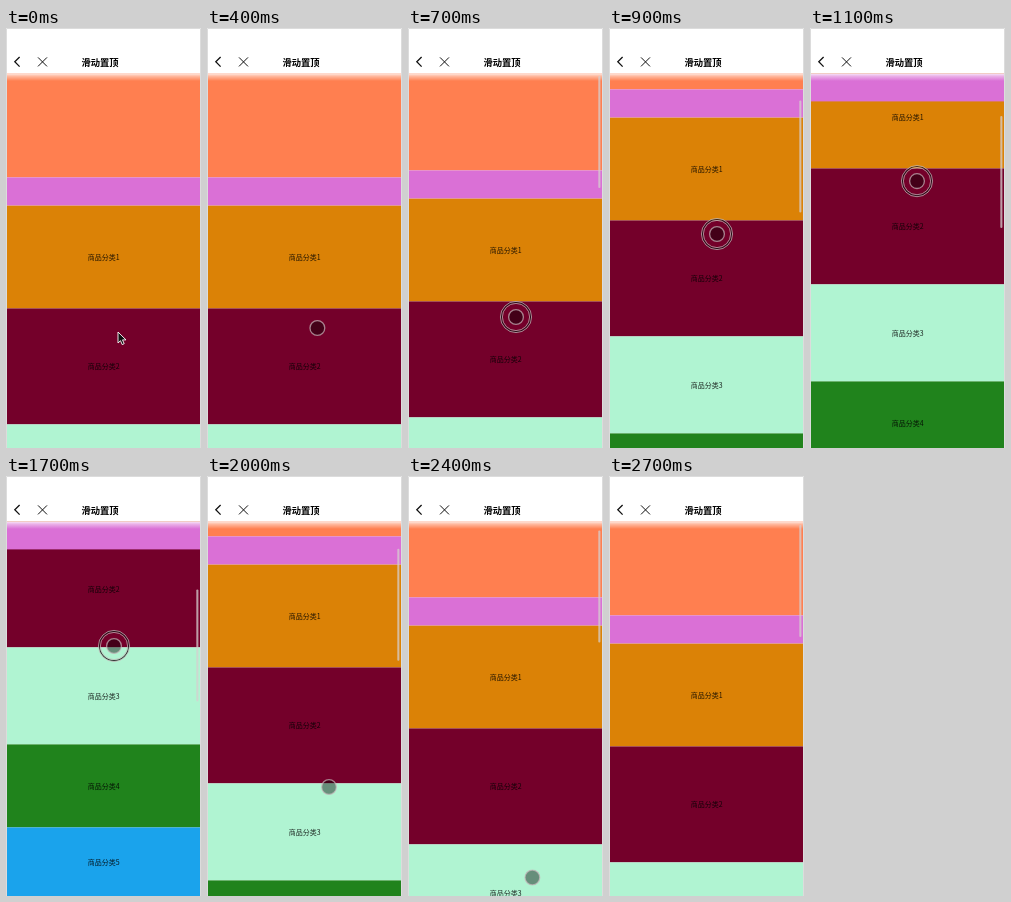
Animation of 195x420 px, one loop 2800 ms. Source, as an HTML page:

```html
<!DOCTYPE html>
<html lang="zh-CN">
<head>
<meta charset="utf-8">
<style>
html, body { margin: 0; width: 100%; height: 100%; overflow: hidden; background: #fff; }
svg { display: block; width: 195px; height: 420px; }
text { font-family: "Noto Sans CJK SC", "Noto Sans CJK", sans-serif; text-anchor: middle; }
</style>
</head>
<body>
<svg viewBox="0 0 195 420">
  <defs>
    <linearGradient id="fade" x1="0" y1="0" x2="0" y2="1">
      <stop offset="0" stop-color="#fff" stop-opacity=".9"/>
      <stop offset=".4" stop-color="#fff" stop-opacity=".45"/>
      <stop offset="1" stop-color="#fff" stop-opacity="0"/>
    </linearGradient>
    <clipPath id="view"><rect x="1" y="45.5" width="193" height="375"/></clipPath>
  </defs>
  <rect width="195" height="420" fill="#fff"/>
  <g clip-path="url(#view)">
    <g id="page"><rect x="1" width="193" height="149" fill="#ff7f50"/></g>
    <rect id="tab" x="1" width="193" height="28" fill="#da70d6"/>
    <rect x="1" y="45" width="193" height="8" fill="url(#fade)"/>
    <rect id="thumb" x="190.3" width="2.1" height="112" rx="1" fill="#d6cfcf" fill-opacity=".75"/>
  </g>
  <path d="M.5 420V.5H194.5V420" fill="none" stroke="#dcdcdc"/>
  <g fill="none" stroke="#111">
    <path d="M13.6 29L8.8 33.8L13.6 38.6" stroke-width="1.3"/>
    <path d="M32 29.4L41 38.4M41 29.4L32 38.4"/>
  </g>
  <text x="94" y="37.5" font-size="9.3" font-weight="700">滑动置顶</text>
  <g id="touch">
    <g id="ring" fill="none">
      <circle r="14.6" stroke="#1c1216" stroke-opacity=".8" stroke-width="1.2"/>
      <circle r="15.6" stroke="#c4bcbc" stroke-opacity=".8" stroke-width=".9"/>
      <circle r="13.6" stroke="#c4bcbc" stroke-opacity=".8" stroke-width=".9"/>
    </g>
    <circle r="7.4" fill="#000" fill-opacity=".42" stroke="#c8b8bc" stroke-opacity=".7" stroke-width="1.3"/>
  </g>
  <path id="arrow" d="M0 0V11L2.5 8.7L4.2 12.6L6.2 11.7L4.5 7.9H8Z" fill="#111" stroke="#fff" stroke-width=".9"/>
</svg>
<script>
const LOOP = 2800, STEP = 100;
const TOP = 45, TAB_Y = 149, SHIFT = 0.4;
const $ = id => document.getElementById(id);

// Gesture keys: time, scroll offset, hand x, hand y
const KEYS = [
  [0, 0, 112, 304],
  [600, 0, 109, 296],
  [700, 7, 108, 289],
  [900, 88, 108, 206],
  [1300, 178, 106, 127],
  [1700, 225, 108, 170],
  [2000, 89, 122, 311],
  [2700, 10, 125, 430]
];

function add(tag, attrs, text = '') {
  const el = document.createElementNS('http://www.w3.org/2000/svg', tag);
  for (const k in attrs) el.setAttribute(k, attrs[k]);
  el.textContent = text;
  $('page').appendChild(el);
}

function buildPage() {
  const parts = [[103, '#db8206'], [116, '#74002a'], [97, '#b0f4d2'], [83, '#20831c'], [70, '#1aa3ec']];
  let y = TAB_Y + 28;
  parts.forEach(([height, fill], i) => {
    add('rect', { x: 1, y, width: 193, height, fill });
    add('text', { x: 97.6, y: y + height / 2 + 2.7, 'font-size': 7, 'fill-opacity': 0.85 }, '商品分类' + (i + 1));
    y += height;
  });
}

const slope = (i, c) => (KEYS[i + 1][c] - KEYS[i][c]) / (KEYS[i + 1][0] - KEYS[i][0]);

// Harmonic mean of both slopes; flat at turning points and ends
function tangent(i, c) {
  if (i === 0 || i === KEYS.length - 1) return 0;
  const a = slope(i - 1, c), b = slope(i, c);
  return a * b > 0 ? 2 * a * b / (a + b) : 0;
}

// Smooth value of column c at time t, without overshoot
function glide(c, t) {
  let i = 0;
  while (i < KEYS.length - 2 && t >= KEYS[i + 1][0]) i++;
  const [p, q] = [KEYS[i], KEYS[i + 1]];
  const span = q[0] - p[0], u = (t - p[0]) / span, v = 1 - u;
  return p[c] * v * v * (1 + 2 * u) + q[c] * u * u * (3 - 2 * u)
    + span * u * v * (tangent(i, c) * v - tangent(i + 1, c) * u);
}

const within = (t, from, to) => t >= from && t < to;
const show = (id, on) => $(id).setAttribute('visibility', on ? 'inherit' : 'hidden');
const move = (id, x, y) => $(id).setAttribute('transform', `translate(${x} ${y})`);

function draw(t) {
  const scroll = Math.round(glide(1, t));
  const x = glide(2, t), y = glide(3, t);
  move('page', 0, SHIFT - scroll);
  $('tab').setAttribute('y', Math.max(TOP, TAB_Y - scroll) + SHIFT);
  $('thumb').setAttribute('y', 46 + scroll * 0.3);
  move('arrow', x, y);
  move('touch', x, y);
  show('thumb', t >= 600);
  show('arrow', t < 400);
  show('touch', within(t, 400, 2500));
  $('ring').setAttribute('opacity', within(t, 500, 1200) || within(t, 1700, 2000) ? 1 : 0);
}

function tick() {
  const t = performance.now() % LOOP;
  draw(Math.floor(t / STEP) * STEP);
  requestAnimationFrame(tick);
}

buildPage();
tick();
</script>
</body>
</html>
```
